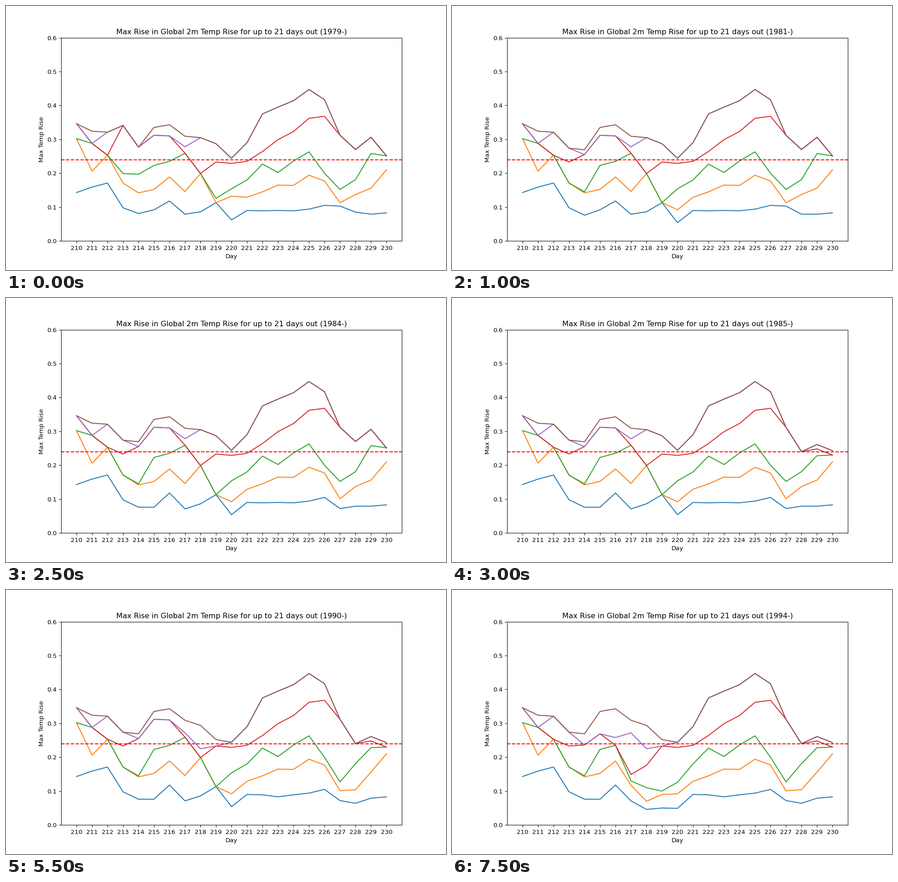
Animation of 966 by 580 pixels, one loop 8000 ms. Source, as a matplotlib script:

```python
import matplotlib.pyplot as plt
from matplotlib.animation import FuncAnimation

DPI = 96
FIRST_DAY, FIRST_YEAR = 210, 1979
FRAMES, INTERVAL = 16, 500
THRESHOLD = 0.24

# Temperature rises in thousandths of a degree, one per day.
BLUE = [143, 159, 171, 98, 81, 92, 118, 79, 86, 113, 62,
        90, 89, 90, 89, 94, 105, 103, 85, 79, 83]
ORANGE = [302, 206, 253, 171, 142, 152, 189, 146, 199, 113, 132,
          129, 145, 165, 164, 194, 177, 113, 137, 156, 210]
GREEN = [302, 288, 253, 199, 197, 223, 235, 259, 199, 126, 154,
         180, 227, 202, 236, 263, 200, 152, 181, 258, 251]
RED = [346, 288, 253, 341, 277, 312, 310, 259, 199, 233, 229,
       235, 264, 299, 323, 362, 368, 312, 270, 306, 251]
BROWN = [346, 324, 321, 341, 277, 335, 343, 309, 305, 287, 244,
         290, 375, 395, 414, 447, 417, 312, 270, 306, 251]

# Start year -> series -> day -> new maximum once earlier years drop out.
UPDATES = {
    1980: {"blue": {214: 76},
           "green": {213: 171, 214: 145},
           "red": {213: 233, 214: 255},
           "purple": {213: 274, 214: 255},
           "brown": {213: 274, 214: 269}},
    1981: {"blue": {220: 54, 228: 79},
           "orange": {220: 92},
           "green": {219: 113}},
    1982: {"blue": {217: 71, 227: 72},
           "orange": {227: 101}},
    1984: {"blue": {215: 76}},
    1985: {"green": {229: 228, 230: 230},
           "red": {228: 240, 229: 248, 230: 230},
           "purple": {228: 240, 229: 261, 230: 243},
           "brown": {228: 240, 229: 261, 230: 243}},
    1988: {"blue": {223: 83}},
    1989: {"blue": {228: 64},
           "orange": {228: 104},
           "green": {227: 127},
           "purple": {217: 272, 218: 225, 219: 233},
           "brown": {218: 294, 219: 252}},
    1991: {"blue": {220: 49},
           "green": {220: 126}},
    1993: {"blue": {218: 46, 219: 50},
           "orange": {217: 117, 218: 70, 219: 90},
           "green": {217: 130, 218: 110, 219: 100},
           "red": {214: 236, 215: 269, 216: 235, 217: 149, 218: 176},
           "purple": {214: 236, 215: 269, 216: 258}},
}


def patched(values, changes):
    """Return a copy of values with the given days replaced."""
    out = list(values)
    for day, value in changes.items():
        out[day - FIRST_DAY] = value
    return out


BASE = {
    "blue": BLUE,
    "orange": ORANGE,
    "green": GREEN,
    "red": RED,
    "purple": patched(BROWN, {211: 288, 215: 312, 216: 310, 217: 278}),
    "brown": BROWN,
}


def series_for(name, year):
    values = BASE[name]
    for start, changes in UPDATES.items():
        if start <= year:
            values = patched(values, changes.get(name, {}))
    return [v / 1000 for v in values]


plt.rcParams.update({"font.family": "DejaVu Sans", "font.size": 10.0625})
fig, ax = plt.subplots(figsize=(966 / DPI, 580 / DPI), dpi=DPI)
fig.subplots_adjust(left=0.125, right=0.9, bottom=0.11, top=0.88)

days = range(FIRST_DAY, FIRST_DAY + len(BLUE))
lines = {name: ax.plot(days, series_for(name, FIRST_YEAR), color=f"tab:{name}")[0]
         for name in BASE}
ax.axhline(THRESHOLD, color="red", linestyle="--")
ax.set(xlim=(209, 231), ylim=(0, 0.6), xticks=days,
       xlabel="Day", ylabel="Max Temp Rise")
title = ax.set_title("")


def update(frame):
    year = FIRST_YEAR + frame
    for name, line in lines.items():
        line.set_ydata(series_for(name, year))
    title.set_text(f"Max Rise in Global 2m Temp Rise for up to 21 days out ({year}-)")
    return [*lines.values(), title]


anim = FuncAnimation(fig, update, frames=FRAMES, interval=INTERVAL,
                     repeat=True, repeat_delay=0, blit=False)
plt.show()
```
